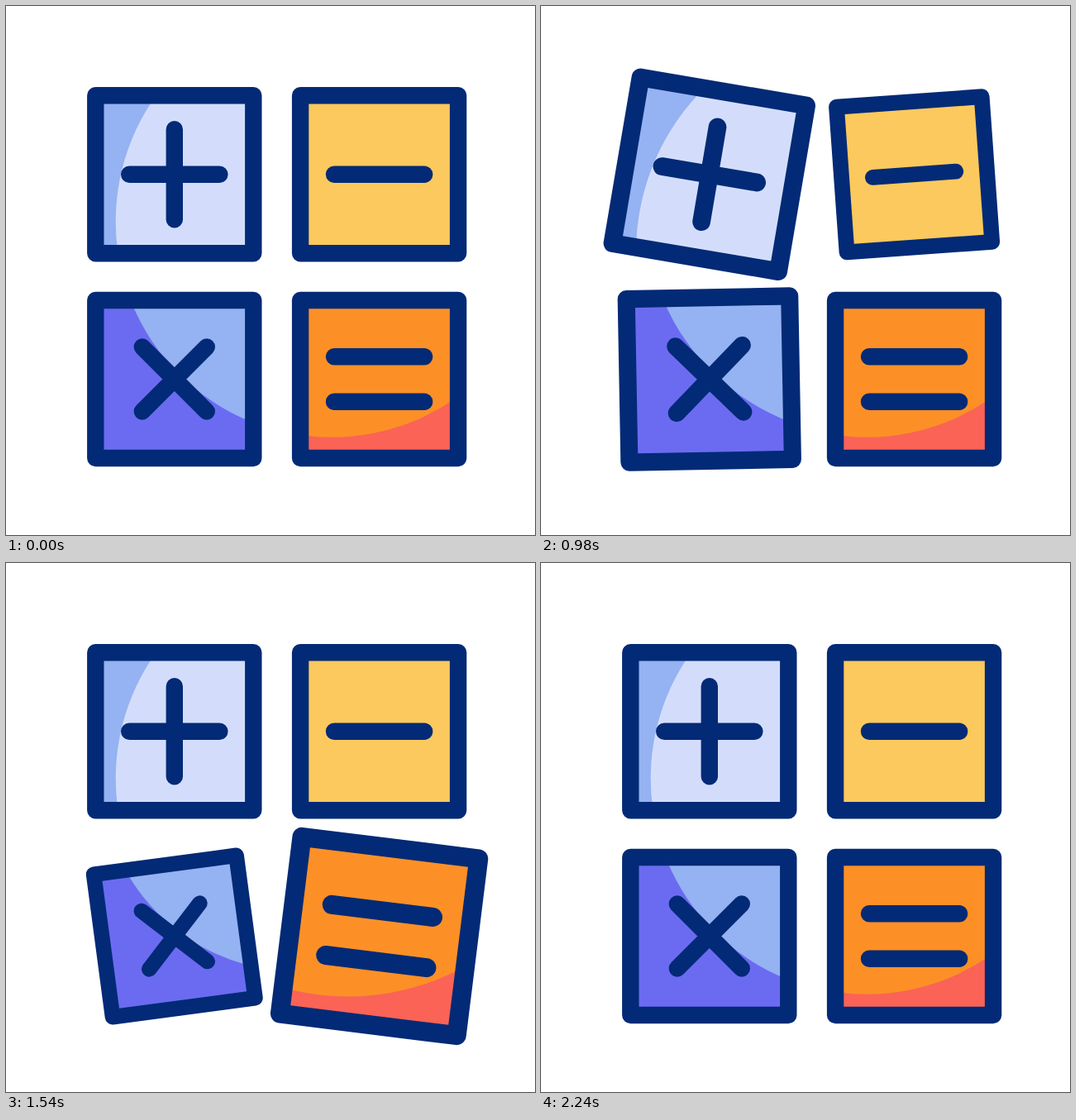
An HTML page that plays this animation: 640x640 px, repeating every 2.4 s.

```html
<!DOCTYPE html>
<html lang="en">
<head>
<meta charset="utf-8">
<title>Calculator keys</title>
<style>
  html, body { margin: 0; width: 100%; height: 100%; overflow: hidden; background: #fff; }
  svg { display: block; width: 100vw; height: 100vh; }
  .line { fill: none; stroke: #032a76; stroke-width: 20.4; stroke-linecap: round; stroke-linejoin: round; }
  .key { transform-origin: 0 0; }
</style>
</head>
<body>
<svg id="stage" viewBox="0 0 640 640">
  <clipPath id="face"><rect x="-91" y="-91" width="182" height="182"/></clipPath>
</svg>
<script>
const LOOP = 2400, START = 200, STAGGER = 340, MOVE = 1000;
const EASE = 'cubic-bezier(0.3333, 0, 0.6667, 1)';

// One large disc lies under all four keys; each key shows its own part of it.
const DISC = { x: 394, y: 260.5, r: 261.3 };

// Listed in the order in which they move.
const keys = [
  { x: 451.6, y: 203.8, base: '#fbc95d', disc: '#fbc95d', turn: -10, sign: 'M-54.6 0H54.6' },
  { x: 203.8, y: 203.8, base: '#95b2f2', disc: '#d3ddfb', turn: 10, sign: 'M-54.6 0H54.6M0-54.6V54.6' },
  { x: 203.8, y: 451.5, base: '#6b6bf2', disc: '#95b2f2', turn: -10, sign: 'M-39-39L39 39M39-39L-39 39' },
  { x: 451.6, y: 451.5, base: '#fa6356', disc: '#fc9026', turn: 10, sign: 'M-54.6-27.3H54.6M-54.6 27.3H54.6' }
];

function add(parent, tag, attrs) {
  const el = document.createElementNS('http://www.w3.org/2000/svg', tag);
  for (const name in attrs) el.setAttribute(name, attrs[name]);
  return parent.appendChild(el);
}

function drawKey({ x, y, base, disc, sign }) {
  const place = add(stage, 'g', { transform: `translate(${x} ${y})` });
  const key = add(place, 'g', { class: 'key' });
  add(key, 'rect', { x: -91, y: -91, width: 182, height: 182, fill: base });
  const face = add(key, 'g', { 'clip-path': 'url(#face)' });
  add(face, 'circle', { cx: DISC.x - x, cy: DISC.y - y, r: DISC.r, fill: disc });
  add(key, 'path', { class: 'line', d: 'M-95.5-95.5H95.5V95.5H-95.5Z' });
  add(key, 'path', { class: 'line', d: sign });
  return key;
}

// Steps are [ms after the key starts, value]; the key rests outside them.
function run(el, prop, start, steps) {
  const rest = steps[0][1];
  const frames = [[-start, rest], ...steps, [LOOP - start, rest]].map(([ms, value]) => ({
    offset: (start + ms) / LOOP, [prop]: value, easing: EASE
  }));
  el.animate(frames, { duration: LOOP, iterations: Infinity });
}

const stage = document.getElementById('stage');
keys.forEach((key, i) => {
  const el = drawKey(key);
  const start = START + i * STAGGER;
  run(el, 'rotate', start, [[0, '0deg'], [MOVE / 2, key.turn + 'deg'], [MOVE, '0deg']]);
  run(el, 'scale', start, [[0, '1'], [300, '1.13'], [700, '0.905'], [MOVE, '1']]);
});
</script>
</body>
</html>
```
